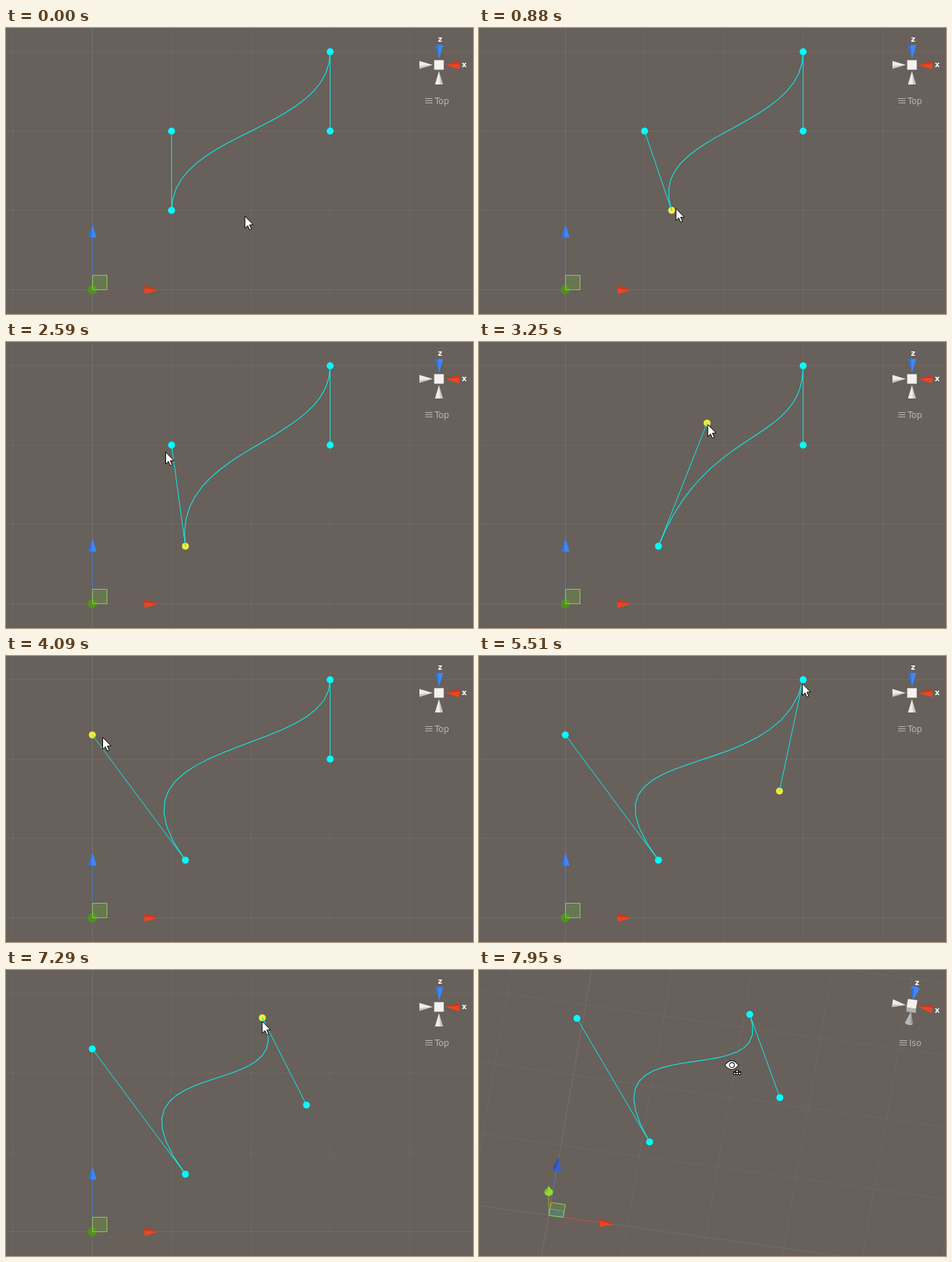
Write an HTML page with a canvas that moves like this. It is 645 px wide and 395 px high and loops after 8 s.

```html
<!DOCTYPE html>
<html lang="en">
<head>
<meta charset="utf-8">
<title>Curve handles</title>
<style>
  html, body { margin: 0; width: 100%; height: 100%; overflow: hidden; background: #67605b; }
  canvas { display: block; }
</style>
</head>
<body>
<canvas id="stage" width="645" height="395"></canvas>
<script>
const ctx = document.getElementById('stage').getContext('2d');
const W = 645, H = 395, LOOP = 8000, STEP = 71;
const CENTER = { x: 322.5, y: 197.5 }, PIVOT_HEIGHT = 55;
const ORIGIN = { x: 119.2, y: 361.4 }, UNIT = 109.5;
const CYAN = '#00ffff', YELLOW = '#f0ee38', LINE = '#0cecec';
const RED = '#ee4422', BLUE = '#3f86f8', LIGHT = '#ededec';
const ORBIT = { at: 7590, steps: 6, yaw: 8.9, pitch: 26.5 };

const pt = (x, y) => ({ x, y });
const add = (p, d, m = 1) => pt(p.x + d.x * m, p.y + d.y * m);
const mix = (a, b, f) => pt(a.x + (b.x - a.x) * f, a.y + (b.y - a.y) * f);
const onGrid = (column, row) => pt(ORIGIN.x + column * UNIT, ORIGIN.y - row * UNIT);

const home = { start: onGrid(1, 1), startHandle: onGrid(1, 2), endHandle: onGrid(3, 2), end: onGrid(3, 3) };
// Where the pointer holds each point.
const grip = { start: pt(6, -2.5), startHandle: pt(1, 2), endHandle: pt(4.5, 3), end: pt(-2, -2) };

const drag = (name, at, steps, to, bend = pt(0, 0)) => ({ name, at, steps, to, bend });
const glide = (at, steps, to) => ({ at, steps, to });
const moves = [
  glide(60, 8, pt(235, 249)),
  drag('start', 880, 5, pt(415.5, 252)),
  drag('start', 1640, 8, pt(247.8, 282), pt(0, -17)),
  glide(2224, 6, pt(220.5, 152)),
  drag('startHandle', 2735, 8, pt(315, 112)),
  drag('startHandle', 3630, 5, pt(119.2, 109)),
  glide(4068, 5, pt(453, 146)),
  drag('endHandle', 4830, 8, pt(415, 186.5), pt(-120, 0)),
  glide(5414, 2, pt(446.5, 38)),
  drag('end', 5790, 6, pt(564, 239)),
  drag('end', 6710, 7, pt(354, 66), pt(67, -130)),
  glide(7221, 5, pt(398, 235)),
  glide(ORBIT.at, ORBIT.steps, pt(349, 131))
];

// Motion advances in even steps; the first one lands as the move begins.
const progress = (move, t) =>
  t < move.at ? 0 : Math.min(1, (Math.floor((t - move.at) / STEP) + 1) / move.steps);

function poseAt(t) {
  const points = { ...home };
  let pointer = pt(330, 260), active = null;
  for (const move of moves) {
    const f = progress(move, t);
    if (!f) break;
    if (move.name) {
      active = move.name;
      points[active] = add(mix(points[active], move.to, f), move.bend, 2 * f * (1 - f));
      pointer = add(points[active], grip[active]);
    } else {
      pointer = mix(pointer, move.to, f * f);
    }
  }
  return { points, pointer, active };
}

function makeView(k) {
  const yaw = ORBIT.yaw * k * Math.PI / 180, pitch = (90 - ORBIT.pitch * k) * Math.PI / 180;
  const c = Math.cos(yaw), s = Math.sin(yaw), sp = Math.sin(pitch);
  const cp = k ? Math.cos(pitch) : 0;
  // Screen offset of a world direction: right, forward, up.
  const dir = (x, z, up = 0) => pt(x * c + z * s, (x * s - z * c) * sp - up * cp);
  const project = (p, up = 0) =>
    add(CENTER, dir(p.x - CENTER.x, CENTER.y - p.y, up - PIVOT_HEIGHT));
  return { k, cp, dir, project };
}

function path(points, color, width = 1) {
  ctx.strokeStyle = color;
  ctx.lineWidth = width;
  ctx.beginPath();
  points.forEach(p => ctx.lineTo(p.x, p.y));
  ctx.stroke();
}

function polygon(points, fill, stroke) {
  ctx.beginPath();
  points.forEach(p => ctx.lineTo(p.x, p.y));
  ctx.closePath();
  ctx.fillStyle = fill;
  ctx.fill();
  if (stroke) {
    ctx.strokeStyle = stroke;
    ctx.lineWidth = 1;
    ctx.stroke();
  }
}

function dot(p, r, color) {
  ctx.fillStyle = color;
  ctx.beginPath();
  ctx.arc(p.x, p.y, r, 0, Math.PI * 2);
  ctx.fill();
}

// A shaded cone along direction d (foreshortened unit vector).
function cone(center, d, base, tip, r, color) {
  const b = add(center, d, base), a = add(center, d, tip);
  const len = Math.hypot(d.x, d.y), angle = Math.atan2(d.y, d.x);
  const n = pt(-Math.sin(angle), Math.cos(angle));
  const minor = r * Math.sqrt(Math.max(0, 1 - len * len));
  ctx.fillStyle = color;
  ctx.beginPath();
  ctx.ellipse(b.x, b.y, minor, r, angle, 0, Math.PI * 2);
  ctx.fill();
  polygon([add(b, n, r), a, add(b, n, -r)], color);
  polygon([add(b, n, -r), a, add(b, n, -r * 0.3)], 'rgba(0,0,0,.16)');
}

function drawGrid(view) {
  const snap = v => view.k ? v : Math.floor(v) + 0.5;
  const gridLine = (a, b, alpha) =>
    path([view.project(a), view.project(b)], `rgba(190,203,193,${alpha})`);
  for (let i = -5; i <= 9; i++) {
    const p = onGrid(i, i), x = snap(p.x), y = snap(p.y);
    gridLine(pt(x, -900), pt(x, 1300), i ? 0.08 : 0.17);
    gridLine(pt(-900, y), pt(1500, y), i ? 0.08 : 0.12);
  }
}

function drawMoveGizmo(view) {
  const o = view.project(pt(119.2, 361.5));
  const right = view.dir(1, 0), forward = view.dir(0, 1), up = view.dir(0, 0, 1);
  const square = (u, v, fill, stroke) => {
    const a = add(o, u, 20);
    polygon([o, a, add(a, v, 20), add(o, v, 20)].map(p => add(p, pt(0.3, 0))), fill, stroke);
  };
  path([o, add(o, forward, 73)], '#4678c8');
  path([o, add(o, right, 73)], view.k ? '#d04a30' : 'rgba(150,70,50,.45)');
  if (view.k) {
    path([o, add(o, up, 73)], '#7cc030');
    square(forward, up, 'rgba(180,70,50,.2)', '#b8523c');
    square(right, up, 'rgba(60,120,190,.3)', '#5fa4dc');
  } else {
    dot(o, 6.4, '#52901f');
  }
  square(right, forward, 'rgba(110,160,60,.35)', '#8fc85c');
  cone(o, forward, 72, 91, 5.9, view.k ? '#3560cc' : BLUE);
  cone(o, right, 72, 91, 5.9, RED);
  if (view.k) cone(o, up, 72, 91, 5.9, '#8fdc2c');
}

function drawCurve(view, { points, active }) {
  const p = {};
  for (const name in points) p[name] = view.project(points[name], UNIT);
  for (const name in p) dot(p[name], 4.8, name === active && !view.k ? YELLOW : CYAN);
  path([p.start, p.startHandle], LINE);
  path([p.end, p.endHandle], LINE);
  const SEGMENTS = 20;
  const curve = Array.from({ length: SEGMENTS + 1 }, (_, i) => {
    const t = i / SEGMENTS;
    const a = mix(p.start, p.startHandle, t);
    const b = mix(p.startHandle, p.endHandle, t);
    const c = mix(p.endHandle, p.end, t);
    return mix(mix(a, b, t), mix(b, c, t), t);
  });
  path(curve, LINE, 1.1);
}

function label(text, x, y, font, color) {
  ctx.font = `${font} "DejaVu Sans", sans-serif`;
  ctx.fillStyle = color;
  ctx.fillText(text, x, y);
}

function drawCompass(view) {
  const { k } = view, c = pt(598, 51 - 1.4 * k);
  cone(c, view.dir(0, 1), 27.5, 8.5, 6, BLUE);
  cone(c, view.dir(1, 0), 28, 8.5, 6, RED);
  cone(c, view.dir(-1, 0), 27, 8.5, 5.5, LIGHT);

  const lift = pt(0, -6.5 * view.cp);
  const corners = [[-1, 1], [1, 1], [1, -1], [-1, -1]].map(([x, z]) => add(c, view.dir(x * 6.6, z * 6.6)));
  const [, , nearRight, nearLeft] = corners;
  polygon([add(nearLeft, lift), add(nearRight, lift), add(nearRight, lift, -1), add(nearLeft, lift, -1)], '#b4b2b0');
  polygon(corners.map(p => add(p, lift)), '#f4f1ef');
  cone(c, view.dir(0, -1), 27, 8.5, 5.5, k ? '#bbb9b7' : LIGHT);

  label('z', 596.5 + 5.5 * k, 19 + 2 * k, 'bold 10.5px', '#fff');
  label('x', 629.5, 54 + 5 * k, 'bold 10.5px', '#fff');

  const grey = '#bcb7b3', shift = k ? 2 : 0;
  for (let i = 0; i < 3; i++) {
    const y = 97.5 + i * 3;
    path([pt(579 + shift, y), pt(589 + shift, y)], grey);
  }
  label(k ? 'Iso' : 'Top', 592 + shift, 105, '11.8px', grey);
}

function drawArrow(p) {
  const outline = [[0, 0], [0, 16.5], [3.8, 13], [6.4, 18.8], [9, 17.6], [6.4, 12], [11.5, 11.8]];
  polygon(outline.map(([x, y]) => add(p, pt(x, y))), '#fff', '#000');
}

function drawEye(p) {
  ctx.save();
  ctx.translate(p.x, p.y);
  ctx.beginPath();
  ctx.moveTo(-9.5, 0.5);
  ctx.quadraticCurveTo(0, -12, 9.5, 0.5);
  ctx.quadraticCurveTo(0, 12, -9.5, 0.5);
  ctx.fillStyle = '#fff';
  ctx.strokeStyle = '#111';
  ctx.lineWidth = 1.1;
  ctx.fill();
  ctx.stroke();
  ctx.beginPath();
  ctx.arc(0.3, 0.3, 3.4, 0, Math.PI * 2);
  ctx.stroke();
  ctx.fillStyle = '#111';
  ctx.fillRect(2, 9, 11, 5);
  ctx.fillRect(5, 7, 5, 5);
  ctx.fillStyle = '#fff';
  for (let i = 0; i < 3; i++) ctx.fillRect(3 + i * 3.5, 11, 2, 2);
  ctx.fillRect(6.5, 8, 2, 2);
  ctx.restore();
}

function draw(t) {
  const view = makeView(progress(ORBIT, t)), pose = poseAt(t);
  ctx.fillStyle = '#67605b';
  ctx.fillRect(0, 0, W, H);
  drawGrid(view);
  drawMoveGizmo(view);
  drawCurve(view, pose);
  drawCompass(view);
  if (view.k) drawEye(pose.pointer);
  else drawArrow(pose.pointer);
}

const began = performance.now();
function tick() {
  draw((performance.now() - began) % LOOP);
  requestAnimationFrame(tick);
}
tick();
</script>
</body>
</html>
```
